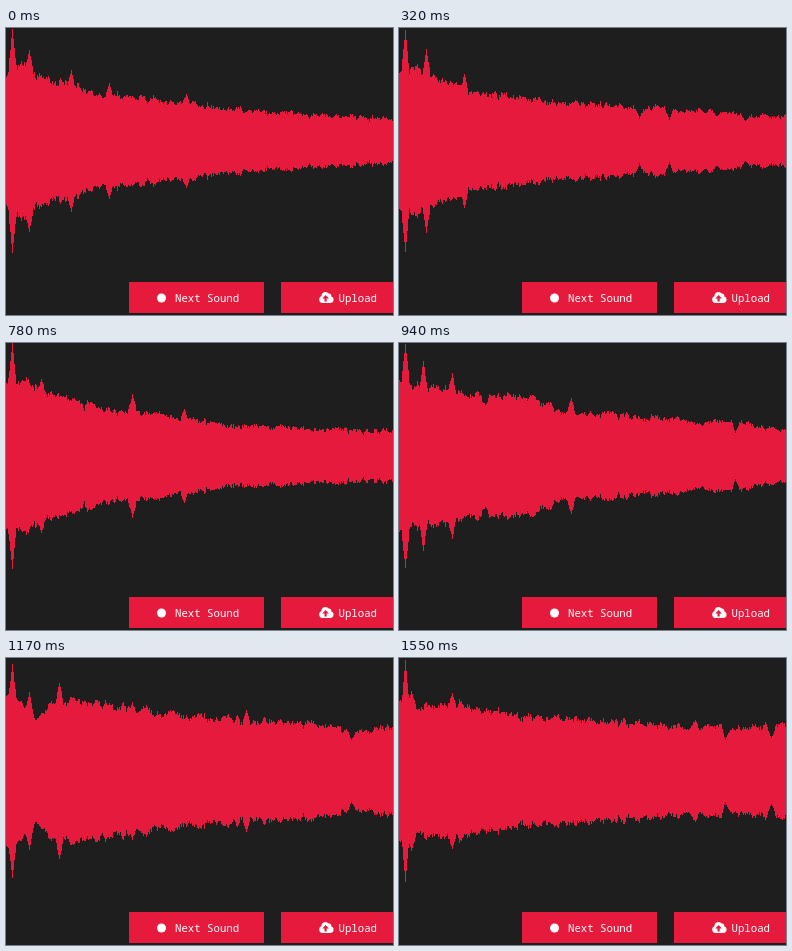
An HTML page for the animation above (1630 ms loop, 387 px wide and 287 px high).

```html
<!DOCTYPE html>
<html lang="en">
<head>
<meta charset="utf-8">
<title>Waveform player</title>
<style>
  html, body { margin: 0; width: 100%; height: 100%; overflow: hidden; background: #1e1e1e; }
  svg { display: block; }
  text { font: 500 10.7px "Noto Sans Mono", "DejaVu Sans Mono", monospace; fill: #fff; }
  .red { fill: #e61a3c; }
  .crisp { shape-rendering: crispEdges; }
</style>
</head>
<body>
<svg width="387" height="287" viewBox="0 0 387 287">
  <path id="wave" class="red crisp"/>
  <rect class="red crisp" x="123" y="254" width="135" height="31"/>
  <rect class="red crisp" x="275" y="254" width="120" height="31"/>
  <circle cx="155.5" cy="270" r="4.5" fill="#fff"/>
  <text x="169" y="274">Next Sound</text>
  <path fill="#fff" d="M316.5 275a3.5 3.5 0 0 1-1-6.8a4 4 0 0 1 7.2-2.6a2.3 2.3 0 0 1 2.6 2.8a3.4 3.4 0 0 1-1.3 6.6z"/>
  <path class="red" d="M319.6 267l3.3 3.4h-2.2v3h-2.2v-3h-2.2z"/>
  <text x="332.5" y="274">Upload</text>
</svg>
<script>
const WIDTH = 387, MID = 113, LOOP = 1630;
const steps = [0, 70, 170, 320, 400, 550, 630, 780, 860, 940, 1020, 1100, 1170, 1250, 1320, 1400, 1480, 1550];
const gridX = [0, 14, 30, 50, 70, 100, 130, 165, 210, 260, 310, 345, 387];

// env: half-height at each gridX; peaks: [x, half-height] of sharp spikes and notches
const poses = [
  { t: 0, env: [68, 77, 66, 58, 53, 45, 43, 39, 33, 29, 26, 23, 22],
    peaks: [[6, 112], [23, 91], [65, 71], [103, 58], [180, 47]] },
  { t: 320, env: [69, 75, 65, 59, 47, 46, 42, 38, 35, 33, 29, 25, 26],
    peaks: [[6, 111], [27, 92], [65, 67], [240, 22], [270, 21], [346, 20]] },
  { t: 550, env: [77, 71, 66, 63, 53, 48, 43, 41, 36, 33, 31, 31, 29],
    peaks: [[6, 107], [17, 93], [53, 77], [342, 17]] },
  { t: 780, env: [73, 77, 69, 60, 53, 46, 44, 39, 33, 29, 27, 25, 25],
    peaks: [[6, 113], [35, 77], [126, 62], [178, 47]] },
  { t: 940, env: [73, 71, 68, 65, 60, 58, 59, 43, 41, 37, 35, 32, 26],
    peaks: [[6, 112], [24, 95], [53, 83], [86, 51], [172, 58], [336, 23]] },
  { t: 1170, env: [75, 71, 55, 70, 70, 68, 62, 56, 52, 50, 47, 39, 43],
    peaks: [[6, 107], [23, 79], [53, 88], [240, 61], [345, 31]] },
  { t: 1550, env: [68, 65, 63, 68, 63, 58, 54, 52, 50, 46, 43, 42, 45],
    peaks: [[6, 111], [12, 80], [53, 78], [296, 51], [326, 31], [372, 33]] }
];

const lerp = (a, b, k) => a + (b - a) * k;

function random(seed, n) {
  const v = Math.sin(seed * 78.233 + n * 12.9898) * 43758.5453;
  return v - Math.floor(v);
}

function jitter(seed, x) {
  const cell = Math.floor(x / 3), k = x / 3 - cell;
  const wide = lerp(random(seed, cell), random(seed, cell + 1), k);
  return wide * 1.2 + random(seed + 40, x) * 0.8 - 1;
}

function height({ env, peaks }, x, noise) {
  const i = Math.max(1, gridX.findIndex(g => g >= x));
  const base = lerp(env[i - 1], env[i], (x - gridX[i - 1]) / (gridX[i] - gridX[i - 1]));
  let h = base + noise * (3 + base * 0.06);
  for (const [px, ph] of peaks) h = lerp(h, ph, Math.max(0, 1 - Math.abs(x - px) / 4));
  return h;
}

function wavePath(step) {
  const time = steps[step];
  const next = poses.findIndex(p => p.t >= time);
  const to = poses[next], from = poses[Math.max(0, next - 1)];
  const k = to === from ? 0 : (time - from.t) / (to.t - from.t);
  let top = `M0 ${MID}`, bottom = "";
  for (let x = 0; x < WIDTH; x++) {
    const noise = jitter(step + 1, x);
    const h = Math.round(lerp(height(from, x, noise), height(to, x, noise), k));
    top += `V${MID - h}H${x + 1}`;
    bottom = `V${MID + h}H${x}` + bottom;
  }
  return top + bottom + "Z";
}

const paths = steps.map((_, i) => wavePath(i));
const wave = document.getElementById("wave");

function draw() {
  const time = performance.now() % LOOP;
  wave.setAttribute("d", paths[steps.findLastIndex(s => s <= time)]);
  requestAnimationFrame(draw);
}
draw();
</script>
</body>
</html>
```
